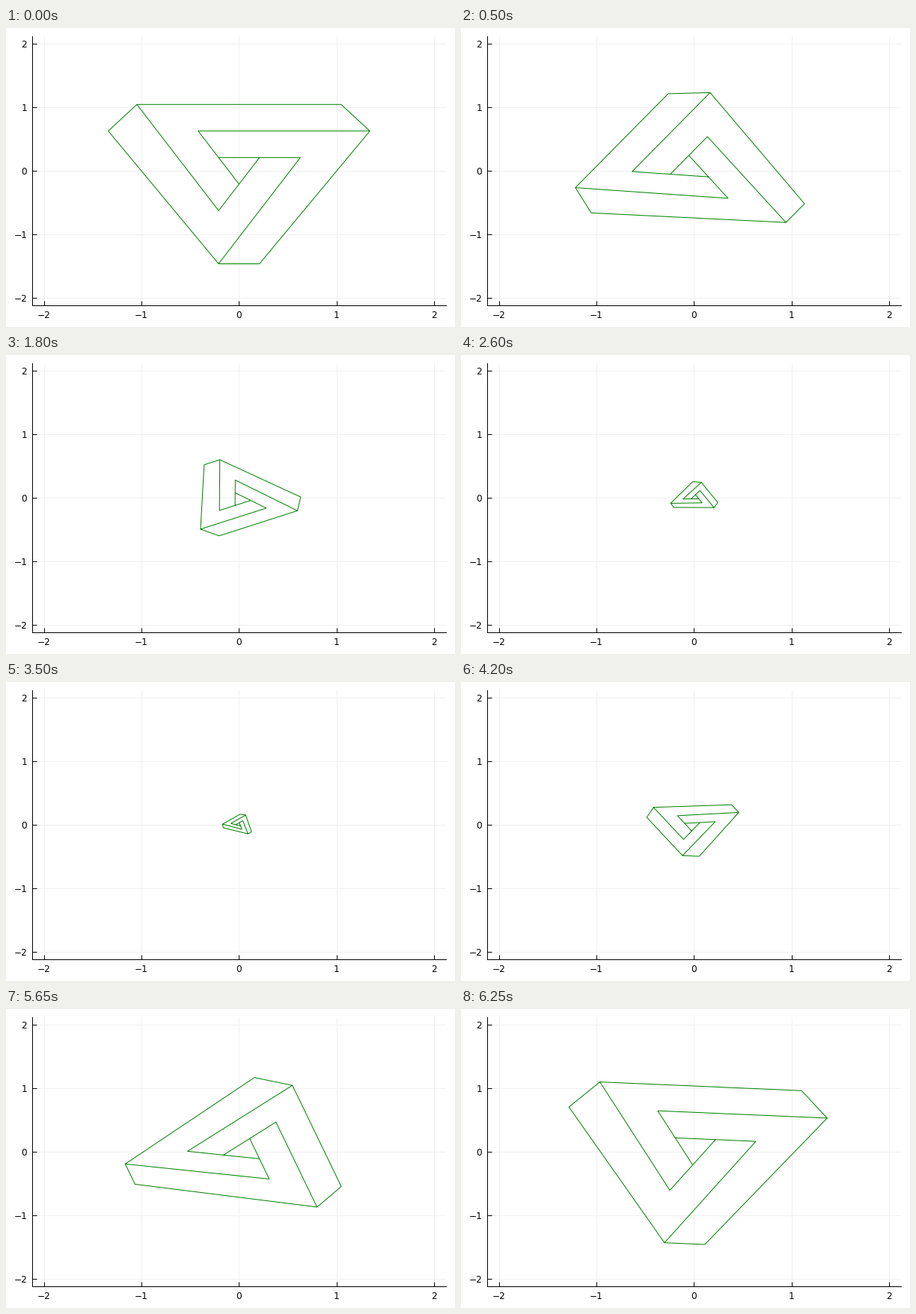
Animation of 600x400 px, one loop 6300 ms. Source, as a matplotlib script:

```python
import numpy as np
import matplotlib.pyplot as plt
from matplotlib.animation import FuncAnimation

W, H, DPI = 600, 400, 100
FRAMES, INTERVAL = 126, 50
STEP = 0.1  # radians per frame
LIM = 2.12
TURN = 2 * np.pi

plt.rcParams["font.family"] = "DejaVu Sans"

# Impossible triangle; its six outer corners lie on a circle of radius sqrt(50)
q = np.sqrt(41)
outline = [(-5, 5), (5, 5), (q, 3), (1, -7), (-1, -7), (-q, 3), (-5, 5)]
strokes = [
    outline,
    [(-5, 5), (-1, -3), (1, 1)],
    [(q, 3), (-2, 3), (0, -1)],
    [(-1, 1), (3, 1), (-1, -7)],
]
gap = complex(np.nan, np.nan)
shape = np.array([z for s in strokes for z in [complex(*p) for p in s] + [gap]])

fig = plt.figure(figsize=(W / DPI, H / DPI), dpi=DPI, facecolor="white")
ax = fig.add_axes([35.1 / W, 1 - 370.9 / H, 552.6 / W, 359.6 / H])
ax.set(xlim=(-LIM, LIM), ylim=(-LIM, LIM))
ticks = range(-2, 3)
ax.set_xticks(ticks)
ax.set_yticks(ticks)
ax.tick_params(direction="in", length=4.3, width=0.72, pad=5, labelsize=8.7)
ax.grid(color="#f0f0f0", linewidth=0.72)
ax.set_axisbelow(True)
for side in ("top", "right"):
    ax.spines[side].set_visible(False)
for side in ("left", "bottom"):
    ax.spines[side].set_linewidth(0.72)

line, = ax.plot([], [], color="green", linewidth=0.72, solid_capstyle="butt")


def draw(i):
    """Spin two turns while shrinking to a point and growing back."""
    angle = i * STEP
    z = shape * abs(TURN - angle) / 30 * np.exp(1j * angle)
    line.set_data(z.real, z.imag)
    return line,


anim = FuncAnimation(fig, draw, frames=FRAMES, interval=INTERVAL,
                     repeat=True, repeat_delay=0)
plt.show()
```
